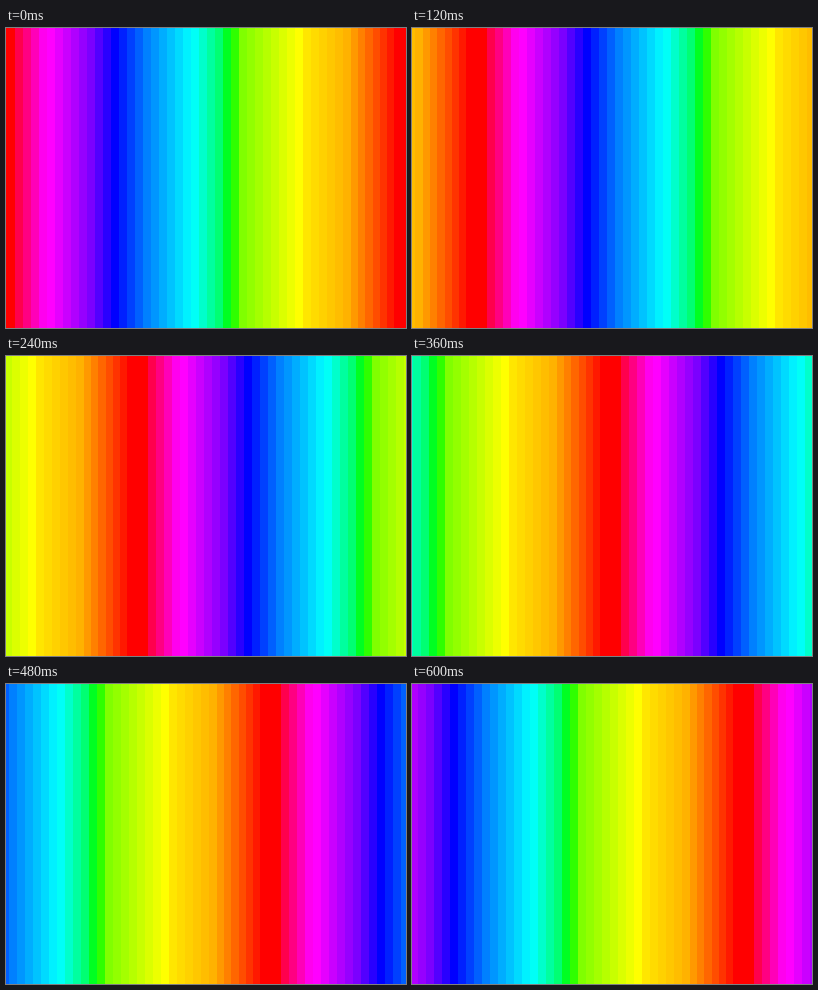
Recreate the animation shown at these times as an HTML page. Size 400 px wide and 300 px high, loop 660 ms.

```html
<!DOCTYPE html>
<html lang="en">
<head>
<meta charset="utf-8">
<title>Sliding spectrum</title>
<style>
  html, body { margin: 0; width: 100%; height: 100%; overflow: hidden; background: #f00; }
  svg { display: block; width: 100%; height: 100%; }
</style>
</head>
<body>
<svg viewBox="0 0 400 300" preserveAspectRatio="none" shape-rendering="crispEdges">
  <g id="bands"></g>
</svg>
<script>
const WIDTH = 400, HEIGHT = 300;
const STEP_MS = 60, STEPS = 11, STEP_PX = WIDTH / 12;
const BAND_COUNT = 50, BAND_PX = 8, TIGHT_FROM = 43, TIGHT_PX = 7.2;

// Key hues by band number; the bands between them are interpolated.
const keyHues = {
  0: 360, 1: 342, 4: 304, 5: 300, 10: 269, 13: 240, 17: 210,
  23: 178, 26: 147, 29: 90, 36: 60, 37: 54, 42: 42, 49: 0
};
const keys = Object.keys(keyHues).map(Number);

function hueAt(band) {
  const next = keys.find(key => key > band);
  if (next === undefined) return keyHues[band];
  const prev = keys[keys.indexOf(next) - 1];
  const mix = (band - prev) / (next - prev);
  return keyHues[prev] + (keyHues[next] - keyHues[prev]) * mix;
}

// The orange bands running into red are slightly narrower.
function bandStart(band) {
  const wide = Math.min(band, TIGHT_FROM);
  return Math.round(1 + BAND_PX * wide + TIGHT_PX * (band - wide));
}

const bands = document.getElementById("bands");

function addBand(x, width, hue) {
  const rect = document.createElementNS("http://www.w3.org/2000/svg", "rect");
  const attrs = { x, y: 0, width, height: HEIGHT, fill: `hsl(${hue}, 100%, 50%)` };
  for (const name in attrs) rect.setAttribute(name, attrs[name]);
  bands.append(rect);
}

// Two copies side by side, so the strip wraps around the stage.
for (const shift of [-WIDTH, 0]) {
  for (let band = 0; band < BAND_COUNT; band++) {
    const start = bandStart(band);
    const end = band + 1 < BAND_COUNT ? bandStart(band + 1) : WIDTH + 1;
    addBand(start + shift, end - start, hueAt(band));
  }
}

function draw(ms) {
  const step = Math.floor(ms / STEP_MS) % STEPS;
  bands.setAttribute("transform", `translate(${Math.floor(step * STEP_PX)} 0)`);
}

const startTime = performance.now();
function tick() {
  draw(performance.now() - startTime);
  requestAnimationFrame(tick);
}
draw(0);
requestAnimationFrame(tick);
</script>
</body>
</html>
```
